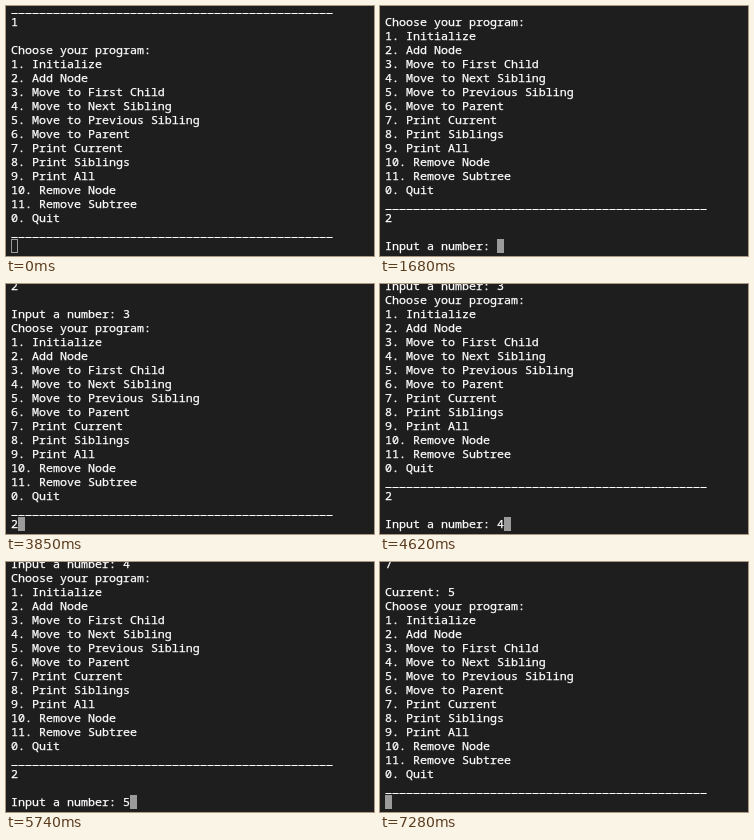
Animation of 368x250 px, one loop 8 s. Source, as an HTML page with a canvas:

```html
<!DOCTYPE html>
<html lang="en">
<head>
<meta charset="utf-8">
<title>Tree menu in a terminal</title>
<style>
  html, body { margin: 0; width: 100%; height: 100%; overflow: hidden; background: #1e1e1e; }
  canvas { display: block; }
</style>
</head>
<body>
<canvas id="screen" width="368" height="250"></canvas>
<script>
const ctx = document.getElementById("screen").getContext("2d");
const LOOP = 8000, FOCUS_TIME = 350;
const LEFT = 5, CELL_W = 7, CELL_H = 14, LAST_ROW_TOP = 233, ROWS = 18;

const rule = "_".repeat(46);
const menu = `Choose your program:
1. Initialize
2. Add Node
3. Move to First Child
4. Move to Next Sibling
5. Move to Previous Sibling
6. Move to Parent
7. Print Current
8. Print Siblings
9. Print All
10. Remove Node
11. Remove Subtree
0. Quit
${rule}
`;
const prompt = "\n\nInput a number: ";

// Text appended to the terminal at each time (ms)
const output = [
  [0, `${rule}\n1\n\n${menu}`],
  [1540, "2"], [1680, prompt], [2870, "3"], [3010, "\n" + menu],
  [3850, "2"], [3990, prompt], [4620, "4"], [4690, "\n" + menu],
  [5110, "2"], [5250, prompt], [5740, "5"], [5880, "\n" + menu],
  [7140, "7"], [7280, "\n\nCurrent: 5\n" + menu],
];

function drawLine(line, top) {
  ctx.fillStyle = "#fff";
  if (line === rule) {
    for (let i = 0; i < line.length; i++)
      ctx.fillRect(LEFT + i * CELL_W + 0.4, top + 12, CELL_W - 0.8, 1);
  } else {
    ctx.fillText(line, LEFT, top + 11);
    ctx.strokeText(line, LEFT, top + 11);
  }
}

function drawCursor(column, focused) {
  const x = LEFT + column * CELL_W;
  if (focused) {
    ctx.fillStyle = "#9b9b9b";
    ctx.fillRect(x, LAST_ROW_TOP, CELL_W, CELL_H);
  } else {
    ctx.strokeStyle = "#9b9b9b";
    ctx.strokeRect(x + 0.5, LAST_ROW_TOP + 0.5, CELL_W - 1, CELL_H - 1);
  }
}

function draw(time) {
  const lines = output.filter(([start]) => start <= time)
    .map(([, text]) => text).join("").split("\n").slice(-ROWS);

  ctx.fillStyle = "#1e1e1e";
  ctx.fillRect(0, 0, 368, 250);
  ctx.font = "500 11.667px 'Noto Sans Mono', 'DejaVu Sans Mono', monospace";
  ctx.strokeStyle = "#fff";
  ctx.lineWidth = 0.25;
  lines.forEach((line, i) =>
    drawLine(line, LAST_ROW_TOP - (lines.length - 1 - i) * CELL_H));
  ctx.lineWidth = 1;
  drawCursor(lines.at(-1).length, time >= FOCUS_TIME);
}

const startTime = performance.now();
function tick() {
  draw((performance.now() - startTime) % LOOP);
  requestAnimationFrame(tick);
}
tick();
</script>
</body>
</html>
```
